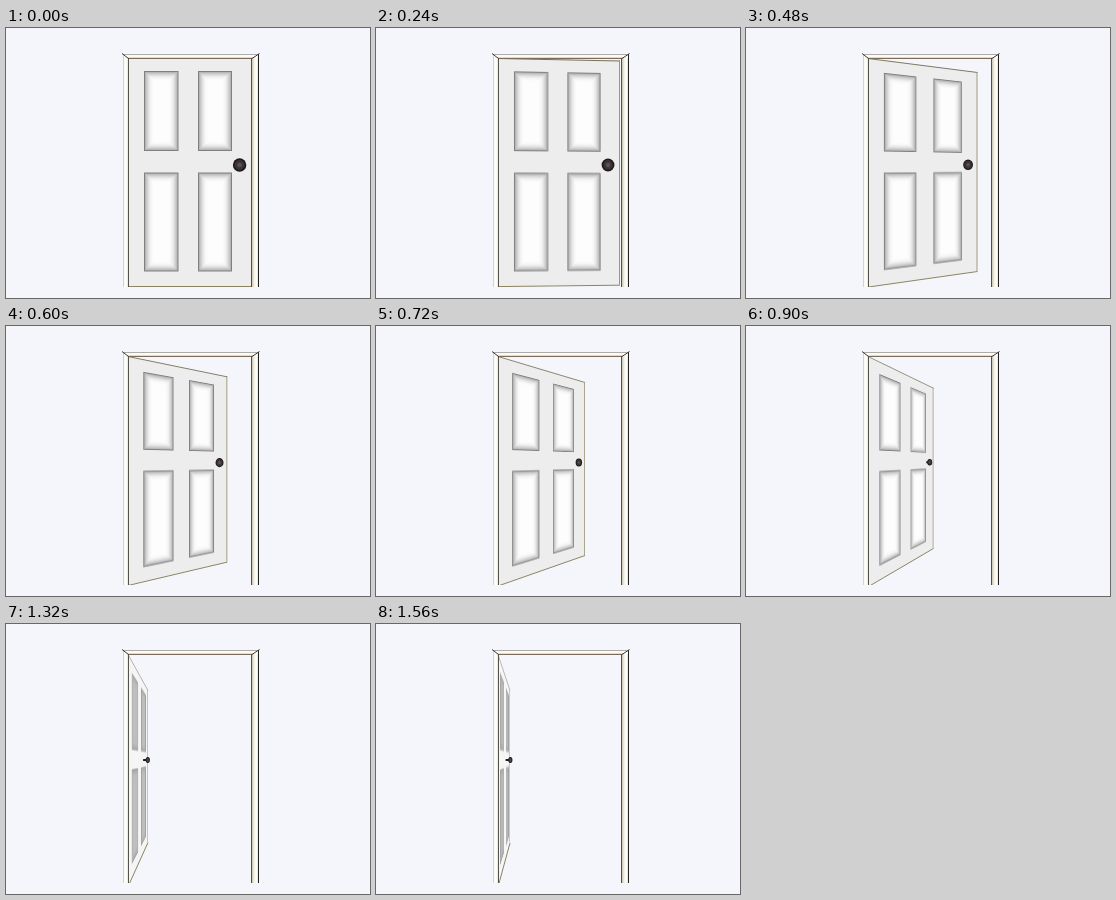
Recreate the animation shown at these times as an HTML page with a canvas. Size 364 by 270 pixels, loop 2.22 s.

```html
<!DOCTYPE html>
<html lang="en">
<head>
<meta charset="utf-8">
<title>Opening door</title>
<style>
  html, body { margin: 0; width: 100%; height: 100%; overflow: hidden; background: #f4f6fb; }
  canvas { display: block; width: 364px; height: 270px; }
</style>
</head>
<body>
<canvas id="stage" width="364" height="270"></canvas>
<script>
const ctx = document.getElementById('stage').getContext('2d');
ctx.imageSmoothingQuality = 'high';

const LOOP = 2220, STEP = 60, LAST = 26;
const HINGE = 122, TOP = 30, BOTTOM = 258, FLOOR = 259, WIDTH = 124, HEIGHT = BOTTOM - TOP;
const PANELS = [[16, 13, 34.5, 80], [70, 13, 34, 80], [16, 114.5, 34.5, 99], [70, 114.5, 34, 99]];

// Free edge of the door: step, x, top y, bottom y
const EDGE = [
  [0, 246, 30, 258], [4, 244, 32.5, 256.7], [8, 231.5, 44, 243], [12, 209, 56, 229],
  [18, 166, 65.8, 217], [22, 142, 66, 218], [26, 134, 66, 218.5]
];

const face = document.createElement('canvas');
face.width = WIDTH;
face.height = HEIGHT;
const paint = face.getContext('2d');

const mix = (a, b, t) => a + (b - a) * t;
const gray = v => `rgb(${v},${v},${v})`;

// Cubic Hermite interpolation with flat ends
function edgeAt(step) {
  let i = 0;
  while (i < EDGE.length - 2 && EDGE[i + 1][0] <= step) i++;
  const a = EDGE[i], b = EDGE[i + 1], span = b[0] - a[0], t = (step - a[0]) / span;
  const slope = (j, c) => {
    const p = EDGE[j - 1], n = EDGE[j + 1];
    return p && n ? (n[c] - p[c]) / (n[0] - p[0]) : 0;
  };
  return [1, 2, 3].map(c =>
    mix(a[c], b[c], t * t * (3 - 2 * t)) +
    span * t * (1 - t) * ((1 - t) * slope(i, c) - t * slope(i + 1, c)));
}

function line(color, ...points) {
  ctx.strokeStyle = color;
  ctx.beginPath();
  for (let i = 0; i < points.length; i += 2) ctx.lineTo(points[i], points[i + 1]);
  ctx.stroke();
}

function paintFace(shade) {
  paint.fillStyle = gray(mix(237, 246, shade));
  paint.fillRect(0, 0, WIDTH, HEIGHT);
  const center = mix(253, 184, shade);
  for (const [x, y, w, h] of PANELS) {
    for (let i = 0; i < 11; i++) {
      const depth = 1 - (1 - i / 10) ** 2.2;
      paint.fillStyle = gray(i ? mix(164, center, depth) : 128);
      paint.fillRect(x + i, y + i, w - 2 * i, h - 2 * i);
    }
  }
}

function post(x, w, ...colors) {
  const tint = ctx.createLinearGradient(x, 0, x + w, 0);
  colors.forEach((color, i) => tint.addColorStop(i / (colors.length - 1), color));
  ctx.fillStyle = tint;
  ctx.fillRect(x, 27, w, FLOOR - 27);
}

function drawFrame() {
  post(117, 5, '#c6c3b6', '#fffffa', '#fffffa', '#e6e2d2');
  post(246, 7, '#cbc4b4', '#f6f3e8', '#ffffff', '#c4c1ba');
  ctx.fillStyle = '#fcfbf6';
  ctx.fillRect(118, 27, 134, 3);
  line('#aeaca8', 117, 26.5, 253, 26.5);
  line('#e2dacb', 121, 29.5, 247, 29.5);
  line('#7d6c59', 122, 30.5, 246, 30.5);
  line('#55524b', 122.5, 30, 122.5, FLOOR);
  line('#57503f', 245.5, 30, 245.5, FLOOR);
  line('#24211e', 252.5, 26, 252.5, FLOOR);
  line('#3c3935', 116, 25.5, 122.5, 30.5);
  line('#3c3935', 253.5, 25.5, 246, 30.5);
}

function drawDoor(step) {
  const [x, top, bottom] = edgeAt(step);
  const span = x - HINGE, closed = span / WIDTH, k = HEIGHT / (bottom - top);
  const foot = BOTTOM + 5 * (1 - closed);
  const across = f => f / (k - f * (k - 1));
  paintFace(Math.max(0, Math.min(1, (40 - span) / 22)));

  ctx.save();
  ctx.beginPath();
  ctx.rect(0, 0, 364, FLOOR);
  ctx.clip();

  // Perspective: one pixel column at a time
  for (let c = 0; c < span; c++) {
    const end = Math.min(c + 1, span), mid = (c + end) / 2 / span;
    const u0 = across(c / span) * WIDTH, u1 = across(end / span) * WIDTH;
    const y0 = mix(TOP, top, mid), y1 = mix(foot, bottom, mid);
    ctx.drawImage(face, u0, 0, u1 - u0, HEIGHT, HINGE + c, y0, end - c, y1 - y0);
  }

  line('#8a8463', HINGE, foot + .5, x, bottom + .5);
  ctx.globalAlpha = mix(.4, 1, closed);
  line('#77705a', HINGE, TOP + .5, x, top + .5);
  line('#9c9679', x - .5, top, x - .5, bottom);
  ctx.restore();
}

function drawKnob(step) {
  const span = edgeAt(step)[0] - HINGE, q = (span / WIDTH) ** 2;
  const [, , top, bottom] = [0, ...edgeAt(step)];
  const u = .9, k = HEIGHT / (bottom - top);
  const x = HINGE + span * u * k / (1 + u * (k - 1)), y = 136 + q;
  const rx = 2.1 + 4.6 * q * q, ry = 3 + 3.7 * q * q, reach = 1.2 * (1 - q);
  const oval = (color, scale) => {
    ctx.fillStyle = color;
    ctx.beginPath();
    ctx.ellipse(x + reach, y, rx * scale, ry * scale, 0, 0, 7);
    ctx.fill();
  };
  ctx.fillStyle = '#1d191a';
  ctx.fillRect(x - 3 * reach, y - 1, 3 * reach, 2);
  oval('#1d191a', 1);
  oval('#3b3334', .75);
  oval('#5a5152', .35);
}

function draw(now) {
  const step = Math.min(LAST, Math.floor(now % LOOP / STEP));
  ctx.fillStyle = '#f4f6fb';
  ctx.fillRect(0, 0, 364, 270);
  drawDoor(step);
  drawFrame();
  drawKnob(step);
  requestAnimationFrame(draw);
}
draw(0);
</script>
</body>
</html>
```
